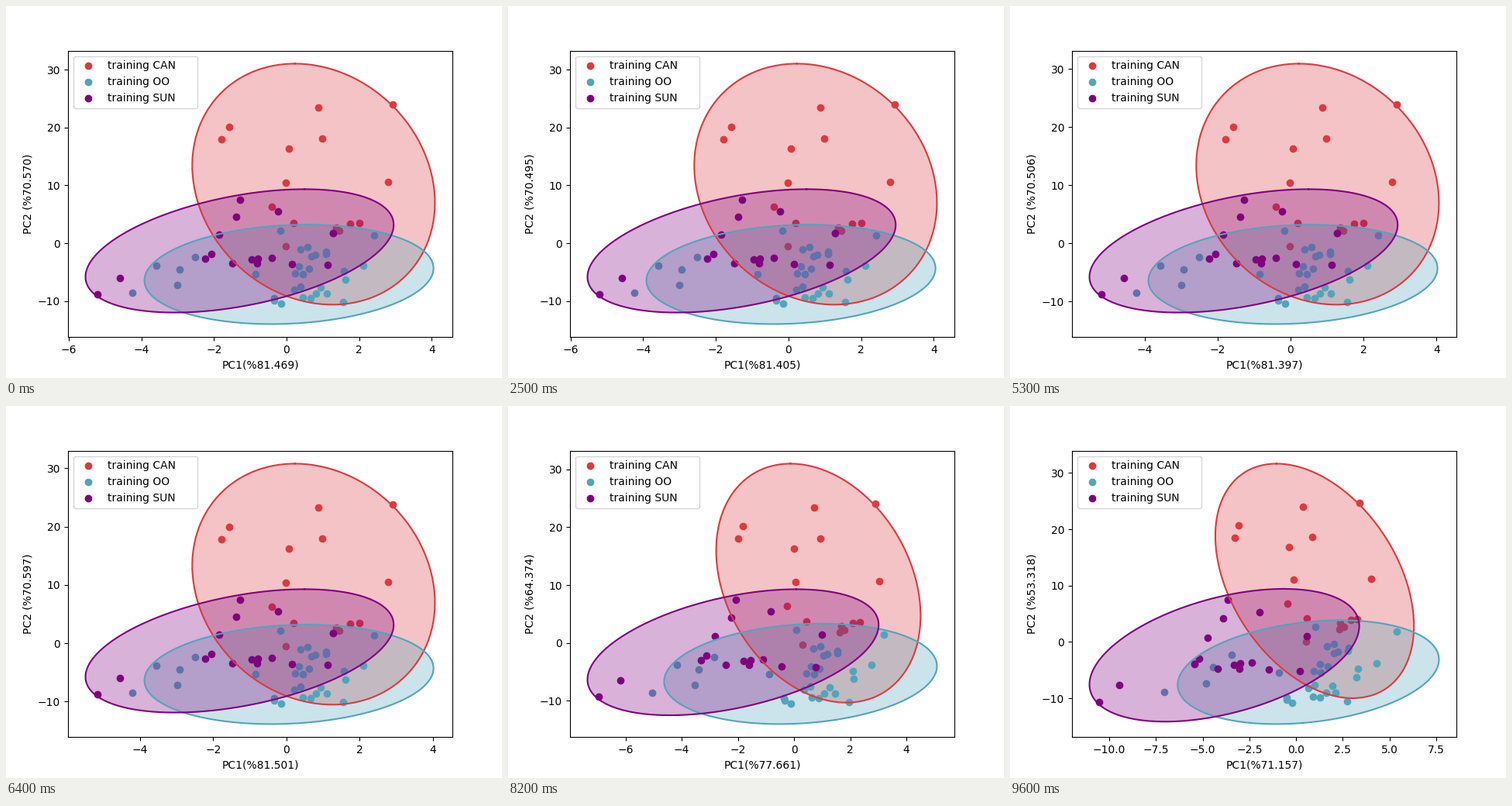
A matplotlib script for the animation above (9700 ms loop, 640x480 px).

```python
import numpy as np
import matplotlib.pyplot as plt
from matplotlib.animation import FuncAnimation

FRAMES, STEP_MS = 97, 100
CALM_END, LATE, LAST = 75, 88, 96
REACH = np.sqrt(5.991)  # 95 % confidence radius for two dimensions

# Share of variance along each component
KEYS = [0, 25, 40, 53, CALM_END, LATE, LAST]
PC1 = [81.469, 81.405, 81.404, 81.397, 81.605, 74.281, 71.157]
PC2 = [70.570, 70.495, 70.475, 70.506, 70.688, 58.962, 53.318]

can = [
    (-1.58, 20.15), (-1.80, 17.95), (.06, 16.3), (.88, 23.4), (.98, 18.05),
    (2.93, 24.05), (-.01, 10.45), (2.80, 10.55), (-.40, 6.25), (.20, 3.55),
    (-.01, -.55), (1.46, 2.1), (1.37, 2.75), (1.76, 3.3), (2.00, 3.45),
    (1.29, 1.7)]
oo = [
    (-4.24, -8.6), (-3.58, -3.9), (-3.0, -7.25), (-2.94, -4.6),
    (-2.51, -2.45), (-.85, -5.4), (-.16, 2.1), (-.35, -9.55),
    (-.33, -9.95), (-.14, -10.45), (.24, -5.25), (.22, -8.05),
    (.35, -4.05), (.39, -1.1), (.58, -.7), (.39, -7.55),
    (.46, -5.4), (.46, -9.4), (.61, -4.45), (.69, -2.3),
    (.80, -2.05), (.67, -9.55), (.82, -8.75), (.95, -7.65),
    (1.12, -8.75), (1.08, -1.4), (1.10, -1.8), (1.59, -4.85),
    (1.63, -6.25), (1.57, -10.2), (2.12, -3.9), (2.42, 1.3)]
sun = [
    (-5.20, -8.85), (-4.58, -6.05), (-2.23, -2.7), (-2.08, -1.9),
    (-1.85, 1.45), (-1.49, -3.45), (-1.38, 4.55), (-1.27, 7.55),
    (-.97, -2.85), (-.80, -3.45), (-.78, -2.65), (-.40, -2.5),
    (-.23, 5.55), (.14, -3.65), (1.29, 1.7), (1.14, -3.8)]


def place(pose, across, up):
    """Map unit-circle coordinates into the ellipse of a pose."""
    cx, cy, half_w, half_h, rho = pose
    x = cx + half_w * (rho * up + np.sqrt(1 - rho ** 2) * across)
    return np.column_stack([x, cy + half_h * up])


def fit(points):
    """Confidence ellipse: centre, half extents, correlation."""
    rho = np.corrcoef(points.T)[0, 1]
    return np.array([*points.mean(0), *REACH * points.std(0, ddof=1), rho])


def padded(low, high):
    pad = .05 * (high - low)
    return low - pad, high + pad


turn = np.linspace(0, 2 * np.pi, 241)
fig, ax = plt.subplots(figsize=(6.4, 4.8), dpi=100)


class Group:
    """A cloud of points carried along by its confidence ellipse."""

    def __init__(self, name, color, points, late, end):
        points = np.array(points)
        self.start, self.late, self.end = fit(points), late, end
        cx, cy, half_w, half_h, rho = self.start
        self.up = (points[:, 1] - cy) / half_h
        self.across = (((points[:, 0] - cx) / half_w - rho * self.up)
                       / np.sqrt(1 - rho ** 2))
        outline = place(self.start, np.sin(turn), np.cos(turn))
        self.dots = ax.scatter(*points.T, color=color,
                               label="training " + name)
        self.area, = ax.fill(*outline.T, facecolor=color, alpha=.3, lw=0)
        self.edge, = ax.plot(*outline.T, color=color, lw=1.5)

    def pose(self, frame):
        calm = self.start.copy()
        calm[:4] *= 1 - .014 * min(frame / CALM_END, 1) ** 3
        return [np.interp(frame, [CALM_END, LATE, LAST], values)
                for values in zip(calm, self.late, self.end)]

    def update(self, frame):
        pose = self.pose(frame)
        outline = place(pose, np.sin(turn), np.cos(turn))
        self.dots.set_offsets(place(pose, self.across, self.up))
        self.area.set_xy(outline)
        self.edge.set_data(*outline.T)
        return outline


groups = [
    Group("CAN", "#dc3a40", can,
          late=(.973, 10.56, 3.933, 20.74, -.375),
          end=(.993, 10.83, 5.313, 20.80, -.384)),
    Group("OO", "#53a4bb", oo,
          late=(.366, -5.375, 5.654, 8.855, .18),
          end=(.655, -5.355, 6.990, 9.205, .245)),
    Group("SUN", "purple", sun,
          late=(-2.944, -1.878, 6.037, 11.213, .446),
          end=(-3.837, -2.355, 7.217, 11.775, .44))]

ax.legend(handles=[g.dots for g in groups], loc="upper left",
          mode="expand", bbox_to_anchor=(0, 0, .3506, 1))


def draw(frame):
    outlines = np.concatenate([g.update(frame) for g in groups])
    low, high = outlines.min(0), outlines.max(0)
    ax.set_xlim(padded(low[0], high[0]))
    ax.set_ylim(padded(low[1], high[1]))
    ax.set_xlabel(f"PC1(%{np.interp(frame, KEYS, PC1):.3f})")
    ax.set_ylabel(f"PC2 (%{np.interp(frame, KEYS, PC2):.3f})")
    return []


anim = FuncAnimation(fig, draw, frames=FRAMES, interval=STEP_MS,
                     init_func=lambda: draw(0), repeat=True, repeat_delay=0)
plt.show()
```
